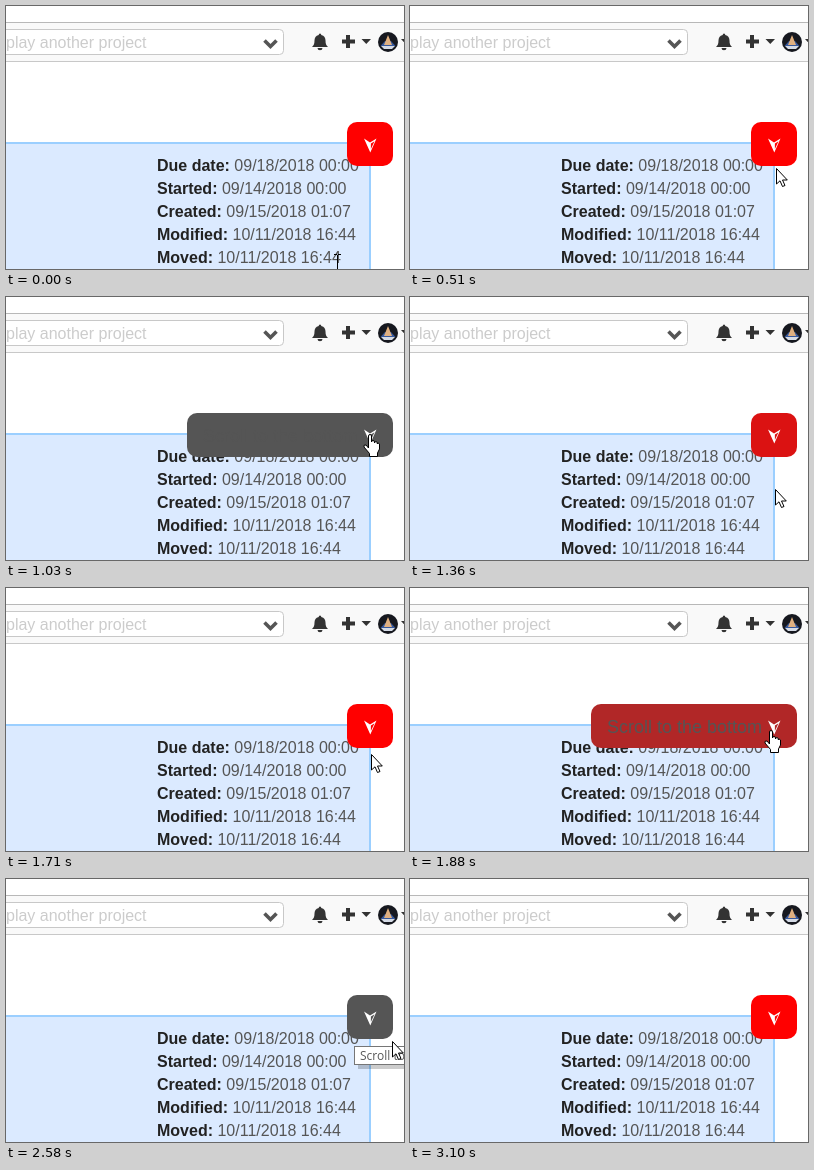
An HTML page for the animation above (3610 ms loop, 398 by 263 pixels).

```html
<!DOCTYPE html>
<html lang="en">
<head>
<meta charset="utf-8">
<title>Scroll button hover</title>
<style>
  html, body { margin: 0; width: 100%; height: 100%; overflow: hidden; background: #fff; }
  svg { display: block; font: 16px "Liberation Sans", Arial, sans-serif; }
  .label { font-weight: bold; fill: #222; }
  .icon { fill: #333; }
</style>
</head>
<body>
<svg width="398" height="263" viewBox="0 0 398 263">
  <!-- top bar -->
  <path fill="#f9f9f9" d="M0 17H398V55H0Z"/>
  <path stroke="#b8b8b8" d="M0 16.5H398"/>
  <path stroke="#c8c8c8" d="M0 55.5H398"/>
  <rect x="-9.5" y="23.5" width="287" height="25" rx="4" fill="#fff" stroke="#c8c8c8"/>
  <text x="0" y="42" fill="#ccc">play another project</text>
  <path d="M258.500 34.500L264.500 40.500L270.500 34.500" fill="none" stroke="#555" stroke-width="3.600"/>
  <g class="icon">
    <path d="M314 27.500q1.300 0 1.300 1.500c3 .7 4.200 3 4.200 5.500 0 3.500.8 5 2.500 6.500H306c1.700-1.500 2.500-3 2.500-6.500 0-2.500 1.200-4.800 4.200-5.500q0-1.500 1.300-1.500ZM311.500 42h5a2.500 2.200 0 0 1-5 0Z"/>
    <path d="M340 29h4v4.500h5v4h-5V42h-4v-4.500h-4v-4h4Z"/>
    <path d="M355.500 33H365l-4.750 5ZM395 33h9.500l-4.750 5Z"/>
  </g>
  <!-- avatar -->
  <circle cx="382" cy="36" r="10" fill="#16181f"/>
  <path fill="#36589c" d="M374.500 40L379 35H385L389.500 40Z"/>
  <path fill="#e0b080" d="M378 39L382 29L386 39Z"/>
  <path fill="#d5dbe6" d="M375 40H389L386 43H378Z"/>

  <!-- details panel -->
  <rect x="-9" y="137" width="373" height="140" fill="#dbeaff" stroke="#9bcfff" stroke-width="2"/>
  <g id="details" fill="#555"></g>

  <!-- scroll button -->
  <rect id="button" y="116" height="44" rx="10"/>
  <text id="caption" x="197" y="145" font-size="18" fill="#555">Scroll to the bottom</text>
  <path fill="#fff" d="M358 132.500L364 136.500L370.500 132.500L364.300 146.500Z"/>
  <path id="facet" d="M364.900 137.500L368.500 135.200L364.900 143Z"/>

  <g id="tip">
    <path fill="#000" opacity=".2" d="M352 171H398V190H352Z"/>
    <rect x="348.500" y="167.500" width="125" height="18" fill="#fff" stroke="#767676"/>
    <text x="354" y="181" font-size="12" fill="#575757" style="font-family:'Open Sans',sans-serif">Scroll to the bottom</text>
  </g>
  <path id="cursor" fill="#fff" stroke="#000"/>
</svg>
<script>
const el = id => document.getElementById(id);
const LOOP = 3610;

const cursors = {
  none: "",
  beam: "M0 .5H3M4 .5H7M3.500 1V15M0 15.500H3M4 15.500H7",
  arrow: "M.5 .5V16L4 12.800L6.500 18.500L9 17.500L6.500 12H11.300Z",
  hand: "M5.500 14V2a1.500 1.500 0 0 1 3 0V8a1.500 1.500 0 0 1 3 0V9a1.400 1.400 0 0 1 2.800 0V10a1.200 1.200 0 0 1 2.200 0V15L14.500 19V22.500H6.500V19.500L1 13Q.2 10.500 3 11Z"
};

// start time, cursor, x, y, button open, progress from red to grey
const steps = [
  [0, "beam", 328, 248, 0, 0],
  [170, "arrow", 383, 208, 0, 0],
  [330, "arrow", 375, 206, 0, 0],
  [510, "arrow", 366, 162, 0, 0],
  [680, "hand", 357, 138, 1, .36],
  [850, "hand", 357, 137, 1, .92],
  [1030, "hand", 357, 137, 1, 1],
  [1190, "arrow", 365, 191, 0, 1],
  [1360, "arrow", 365, 192, 0, .21],
  [1540, "arrow", 365, 190, 0, 0],
  [1710, "arrow", 365, 166, 0, 0],
  [1880, "hand", 354, 142, 1, .46],
  [2070, "hand", 354, 142, 1, .96],
  [2240, "hand", 354, 142, 1, 1],
  [2580, "arrow", 386, 162, 0, 1],
  [2770, "arrow", 386, 176, 0, .21],
  [2940, "beam", 329, 243, 0, 0],
  [3100, "none", 0, 0, 0, 0]
];

el("details").innerHTML = [
  ["Due date", "09/18/2018 00:00"],
  ["Started", "09/14/2018 00:00"],
  ["Created", "09/15/2018 01:07"],
  ["Modified", "10/11/2018 16:44"],
  ["Moved", "10/11/2018 16:44"]
].map(([label, date], i) =>
  `<text x="151" y="${165 + 23 * i}"><tspan class="label">${label}:</tspan> ${date}</text>`
).join("");

function draw(now) {
  const t = now % LOOP;
  const [, kind, x, y, open, p] = steps.findLast(s => s[0] <= t);
  const mix = (a, b) => Math.round(a + (b - a) * p);
  const color = `rgb(${mix(255, 85)},${mix(0, 85)},${mix(0, 85)})`;

  const left = open ? 181 : 341;
  el("button").setAttribute("x", left);
  el("button").setAttribute("width", 387 - left);
  el("button").setAttribute("fill", color);
  el("facet").setAttribute("fill", color);
  el("caption").style.display = open ? "" : "none";
  el("tip").style.display = t >= 2410 && t < 2770 ? "" : "none";
  el("cursor").setAttribute("d", cursors[kind]);
  el("cursor").setAttribute("transform", `translate(${x} ${y})`);
}

const start = performance.now();
function tick() {
  draw(performance.now() - start);
  requestAnimationFrame(tick);
}
tick();
</script>
</body>
</html>
```
